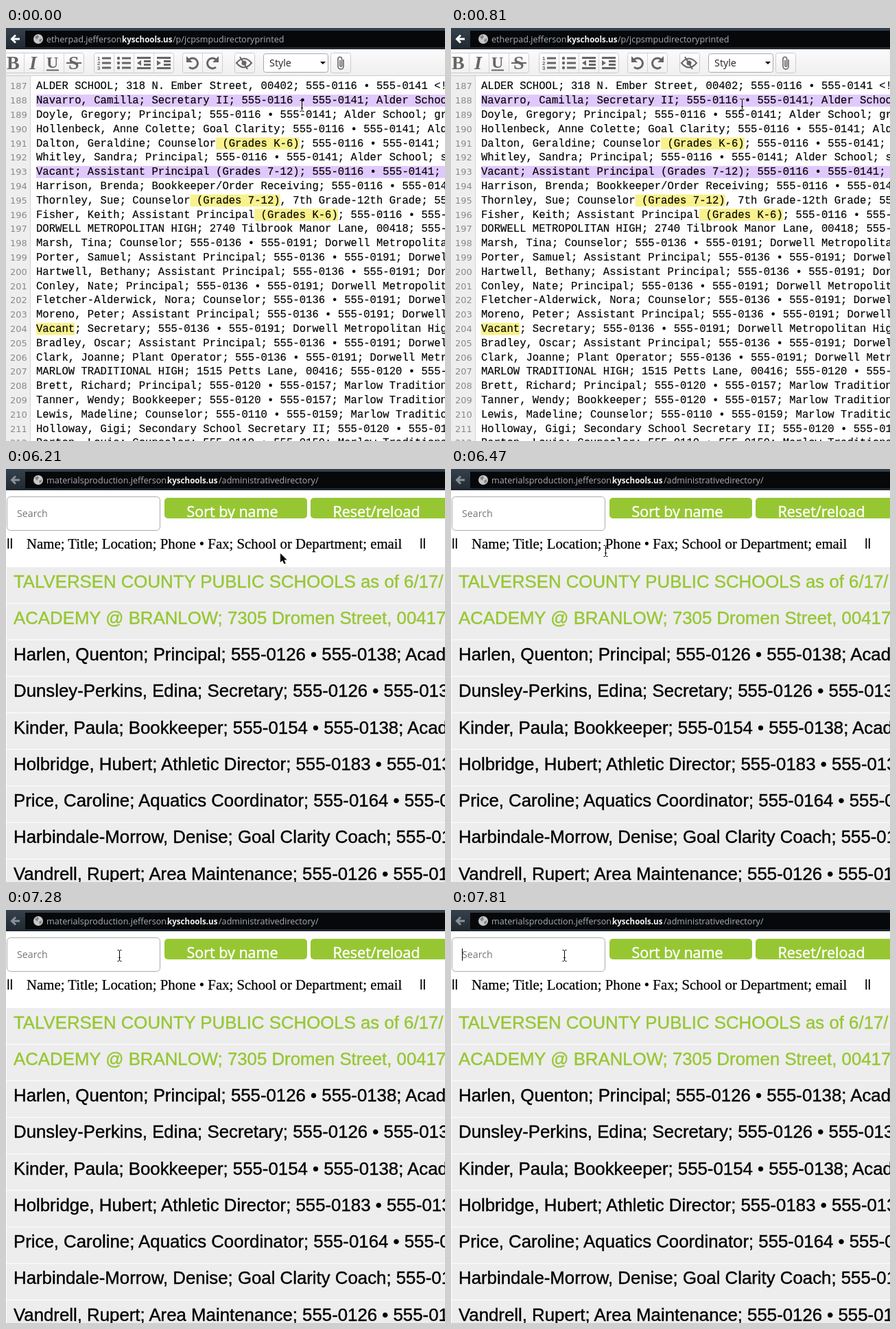
Write an HTML page that moves like this. It is 640 px wide and 602 px high and loops after 8 s.

```html
<!DOCTYPE html>
<html lang="en">
<head>
<meta charset="utf-8">
<title>Directory</title>
<style>
html, body { margin: 0; width: 100%; height: 100%; overflow: hidden; background: #fff; }
svg { display: block; }
text { white-space: pre; }
.ui { font-family: "Open Sans", sans-serif; }
.mono { font: 15.6px "Liberation Mono", monospace; stroke: #000; stroke-width: .15; }
.num { font: 13px "DejaVu Sans", sans-serif; fill: #8a8a8a; }
.serif { font: 20.8px "Liberation Serif", serif; stroke: #000; stroke-width: .25; }
.list { font: 25.8px "Liberation Sans", sans-serif; stroke-width: .4; }
.bars { font: 20.8px "Liberation Sans", sans-serif; }
.url { font-size: 12.6px; fill: #a9aeb4; }
.host { font-size: 11.6px; font-weight: bold; fill: #f4f4f4; }
.label { font-size: 21.5px; fill: #fff; stroke: #fff; stroke-width: .5; }
.format { font: bold 28px "Liberation Serif", serif; fill: #666; }
.icon { fill: none; stroke: #666; stroke-width: 3; }
.solid { fill: #666; stroke: none; }
.digit { font: bold 8px "Liberation Sans", sans-serif; fill: #666; stroke: none; }
</style>
</head>
<body>
<svg id="stage" width="640" height="602" viewBox="0 0 640 602"></svg>
<script>
const GREEN = "#96c733";

// "#" stands for the common phone prefix, {…} is marked yellow, a leading "~" marks the line
const padLines = `ALDER SCHOOL; 318 N. Ember Street, 00402; #16 • #41 <!--
~Navarro, Camilla; Secretary II; #16 • #41; Alder School
Doyle, Gregory; Principal; #16 • #41; Alder School; gregory
Hollenbeck, Anne Colette; Goal Clarity; #16 • #41; Alder School
Dalton, Geraldine; Counselor{ (Grades K-6)}; #16 • #41; Alder
Whitley, Sandra; Principal; #16 • #41; Alder School; sandra
~Vacant; Assistant Principal (Grades 7-12); #16 • #41; Alder
Harrison, Brenda; Bookkeeper/Order Receiving; #16 • #41; Alder
Thornley, Sue; Counselor{ (Grades 7-12)}, 7th Grade-12th Grade; #16
Fisher, Keith; Assistant Principal{ (Grades K-6)}; #16 • #41
DORWELL METROPOLITAN HIGH; 2740 Tilbrook Manor Lane, 00418; #36
Marsh, Tina; Counselor; #36 • #91; Dorwell Metropolitan High
Porter, Samuel; Assistant Principal; #36 • #91; Dorwell
Hartwell, Bethany; Assistant Principal; #36 • #91; Dorwell
Conley, Nate; Principal; #36 • #91; Dorwell Metropolitan High
Fletcher-Alderwick, Nora; Counselor; #36 • #91; Dorwell
Moreno, Peter; Assistant Principal; #36 • #91; Dorwell
{Vacant}; Secretary; #36 • #91; Dorwell Metropolitan High
Bradley, Oscar; Assistant Principal; #36 • #91; Dorwell
Clark, Joanne; Plant Operator; #36 • #91; Dorwell Metropolitan
MARLOW TRADITIONAL HIGH; 1515 Petts Lane, 00416; #20 • #57
Brett, Richard; Principal; #20 • #57; Marlow Traditional High
Tanner, Wendy; Bookkeeper; #20 • #57; Marlow Traditional High
Lewis, Madeline; Counselor; #10 • #59; Marlow Traditional High
Holloway, Gigi; Secondary School Secretary II; #20 • #57
Barton, Louis; Counselor; #10 • #59; Marlow Traditional High`
  .replace(/#/g, "555-01").split("\n");

const people = `TALVERSEN COUNTY PUBLIC SCHOOLS as of 6/17/
ACADEMY @ BRANLOW; 7305 Dromen Street, 00417
Harlen, Quenton; Principal; #26 • #38; Academy
Dunsley-Perkins, Edina; Secretary; #26 • #38
Kinder, Paula; Bookkeeper; #54 • #38; Academy
Holbridge, Hubert; Athletic Director; #83 • #38
Price, Caroline; Aquatics Coordinator; #64 • #38
Harbindale-Morrow, Denise; Goal Clarity Coach; #26
Vandrell, Rupert; Area Maintenance; #26 • #38`
  .replace(/#/g, "555-01").split("\n");

const text = (x, y, cls, str, extra = "") =>
  `<text x="${x}" y="${y}" class="${cls}" ${extra}>${str.replace(/</g, "&lt;")}</text>`;
const rect = (x, y, w, h, fill, extra = "") =>
  `<rect x="${x}" y="${y}" width="${w}" height="${h}" fill="${fill}" ${extra}/>`;
const path = (d, extra = "") => `<path d="${d}" ${extra}/>`;
const icon = (x, body, flip = 1) =>
  `<g class="icon" transform="translate(${x} 51) scale(${flip} 1)">${body}</g>`;

function browserBar(arrow, parts) {
  return rect(0, 0, 640, 31, "url(#bar)") + rect(28, 4, 612, 24, "#07080a") +
    path("M20 16H9M14 10.5L8.5 16l5.5 5.5", `fill="none" stroke="${arrow}" stroke-width="3"`) +
    `<circle cx="47" cy="16" r="7" fill="#c9c9c9"/>` +
    path("M42 13l4-3 2 3-3 4zM48 17l4-2v4l-3 2z", 'fill="#858585"') +
    parts.map(([x, str], i) => text(x, 20.5, "ui " + (i === 1 ? "host" : "url"), str)).join("");
}

function group(x, count) {
  let out = rect(x + .5, 36.5, count * 29, 29, "url(#button)", 'rx="3" stroke="#ccc"');
  for (let i = 1; i < count; i++) out += rect(x + i * 29, 37, 1, 28, "#d4d4d4");
  return out;
}

function toolbar() {
  const turn = path("M-6-4A7.5 7.5 0 1 1-5 6") + path("M-9-10v9h9z", 'class="solid"');
  const rows = path("M-3-7H10M-3 0H10M-3 7H10");
  const dent = path("M-10-7.5H10M0-2.5H10M0 2.5H10M-10 7.5H10");
  const dots = [-7, 0, 7].map(y => `<circle cx="-8" cy="${y}" r="2.2" class="solid"/>`).join("");
  const digits = [-4, 3, 10].map((y, i) => text(-10, y, "digit", String(i + 1))).join("");
  return rect(0, 31, 640, 38, "url(#tools)") + rect(0, 69, 640, 1, "#ccc") +
    group(-3, 4) + group(128, 4) + group(257, 2) + group(333, 1) + group(473, 1) +
    text(1, 60, "format", "B") + text(34, 60, "format", "I", 'style="font-style:italic"') +
    text(59, 58, "format", "U", 'style="font-size:24px"') + text(91, 60, "format", "S") +
    path("M59 61.5H77M88 51H110", 'stroke="#666" stroke-width="2"') +
    icon(143, rows + digits) + icon(172, rows + dots) +
    icon(201, dent + path("M-4-4v8l-6-4z", 'class="solid"')) +
    icon(230, dent + path("M-10-4v8l6-4z", 'class="solid"')) +
    icon(272, turn) + icon(301, turn, -1) +
    icon(347, path("M-11 0Q0-13 11 0Q0 13-11 0z", 'stroke-width="2"') +
      `<circle r="3.5" class="solid"/>` + path("M-6-9L5 9", 'stroke-width="2"')) +
    rect(375.5, 37.5, 94, 27, "#fff", 'rx="3" stroke="#aaa"') +
    text(384, 56, "ui", "Style", 'font-size="14.4" fill="#222"') +
    path("M458 49h8l-4 4z") +
    icon(488, path("M4-5V5a4 4 0 0 1-8 0V-6a2.8 2.8 0 0 1 5.6 0V4a1.2 1.2 0 0 1-2.6 0V-4",
      'stroke-width="1.6"'));
}

function padLine(line, i) {
  const y = 89.3 + i * 20.8, top = y - 13, cw = 9.362;
  const plain = line.replace(/[~{}]/g, "");
  const open = line.indexOf("{"), close = line.indexOf("}");
  let out = "";
  if (line[0] === "~") out += rect(44, top, 596, 17.6, "#e0c8fc");
  if (open >= 0) out += rect(44 + open * cw, top, (close - open - 1) * cw, 17.6, "#f8f18c");
  return out + text(6, y, "num", String(187 + i)) + text(44, y, "mono", plain);
}

const padPage = () => rect(0, 70, 35, 532, "#eee") + rect(35, 70, 1, 532, "#d4d4d4") +
  padLines.map(padLine).join("") + toolbar() +
  browserBar("#fff", [[59, "etherpad.jefferson."], [169, "kyschools.us"], [243, "/p/jcpsmpudirectoryprinted"]]);

const greenButton = (x, label) => rect(x, 42, 208, 30, GREEN, 'rx="5"') +
  text(x + 32.5, 70, "ui label", label, 'clip-path="url(#cut)"');

function person(row, i) {
  const color = i < 2 ? GREEN : "#000", y = 143 + i * 53.25;
  return rect(1, y, 639, 52.25, "#ededed") +
    text(11, y + 29.7, "list", row, `fill="${color}" stroke="${color}"`);
}

const listPage = () =>
  browserBar("#8b9197", [[59, "materialsproduction.jefferson."], [235, "kyschools.us"], [310, "/administrativedirectory/"]]) +
  rect(1.5, 40.5, 223, 49, "#fff", 'rx="5" stroke="#aaa"') +
  text(16, 70, "ui", "Search", 'font-size="14.2" fill="#757575"') +
  greenButton(231, "Sort by name") + greenButton(444, "Reset/reload") +
  text(1, 116, "bars", "ll") + text(603, 116, "bars", "ll") +
  text(30, 116, "serif", "Name; Title; Location; Phone • Fax; School or Department; email") +
  people.map(person).join("");

const gradient = (id, a, b) => `<linearGradient id="${id}" x2="0" y2="1">
  <stop stop-color="${a}"/><stop offset="1" stop-color="${b}"/></linearGradient>`;

const beam = path("M.5.5H2.5L3.5 1.5L4.5.5H6.5M3.5 1V16M.5 16.5H2.5L3.5 15.5L4.5 16.5H6.5M2 11.5H5",
  'fill="none" stroke="#000"');
const arrow = path("M0 0V13L3 10.2L5.5 15.6L7.8 14.6L5.4 9.4H9.6z",
  'stroke="#fff" stroke-width="1.6" paint-order="stroke"');

document.getElementById("stage").innerHTML = `<defs>
  ${gradient("bar", "#34414d", "#202830")}${gradient("tools", "#fafafa", "#f0f0f0")}
  ${gradient("button", "#fff", "#f0f0f0")}
  <clipPath id="cut"><rect y="42" width="640" height="30"/></clipPath></defs>
  <g id="pad">${padPage()}</g>
  <g id="list">${listPage()}${rect(16, 56, 1, 18, "#000", 'id="caret"')}</g>
  <g id="beam">${beam}</g>
  <g id="arrow">${arrow}</g>`;

// start time, page, pointer shape, pointer x, y, caret visible
const steps = [
  [0, "pad", "beam", 428, 105, false],
  [810, "pad", "beam", 421, 103, false],
  [5670, "list", "beam", 421, 103, true],
  [6210, "list", "arrow", 400, 123, false],
  [6470, "list", "beam", 222, 111, false],
  [6740, "list", "beam", 167, 62, true],
  [7010, "list", "beam", 162, 58, true],
  [7280, "list", "beam", 162, 58, false],
  [7810, "list", "beam", 162, 58, true]
];

const el = id => document.getElementById(id);
const show = (id, on) => { el(id).style.display = on ? "" : "none"; };
const start = performance.now();

function draw() {
  const t = Math.max(0, performance.now() - start) % 8000;
  const [, page, pointer, x, y, caret] = steps.filter(s => s[0] <= t).pop();
  show("pad", page === "pad");
  show("list", page === "list");
  show("beam", pointer === "beam");
  show("arrow", pointer === "arrow");
  show("caret", caret);
  el(pointer).setAttribute("transform", `translate(${x} ${y})`);
  requestAnimationFrame(draw);
}
draw();
</script>
</body>
</html>
```
